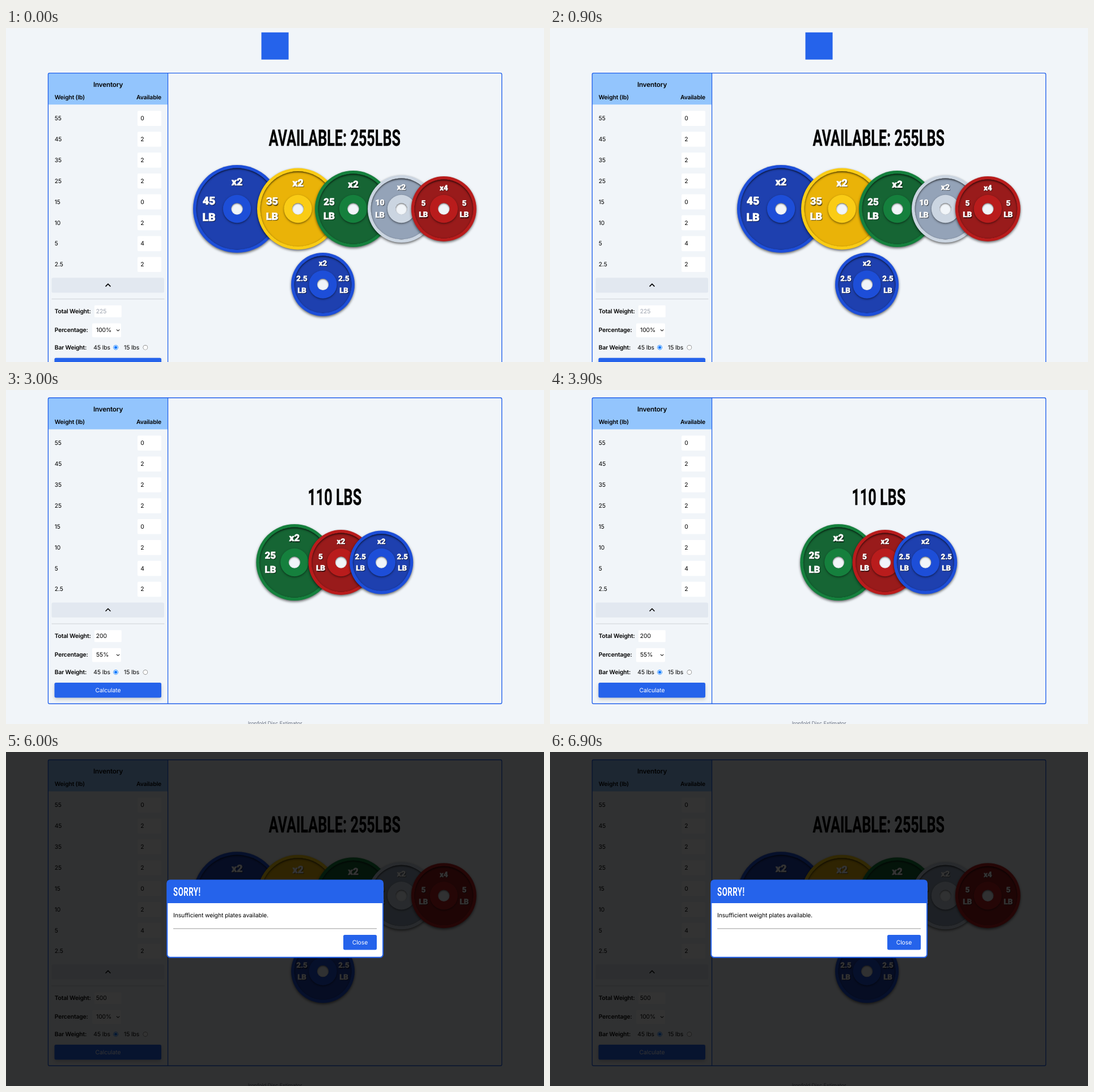
Recreate the animation shown at these times as an HTML page with a canvas. Size 949 px wide and 590 px high, loop 7.5 s.

```html
<!DOCTYPE html>
<html lang="en">
<head>
<meta charset="utf-8">
<title>Plate calculator</title>
<style>
html, body { margin: 0; width: 100%; height: 100%; overflow: hidden; background: #f1f5f9; }
canvas { display: block; width: 949px; height: 590px; }
</style>
</head>
<body>
<canvas id="stage"></canvas>
<script>
const W = 949, H = 590, STEP = 1500;
const canvas = document.getElementById('stage');
const ctx = canvas.getContext('2d');
const dpr = window.devicePixelRatio || 1;
canvas.width = W * dpr;
canvas.height = H * dpr;

const BLUE = '#2563eb', PAGE = '#f1f5f9';
const UI = 'Inter, "Noto Sans", sans-serif';
const CHUNKY = 'Roboto, Lato, sans-serif';
const TITLE = 'Roboto, "Liberation Sans", sans-serif';
const CONDENSED = 0.63;

// r: radius, size: label size, dx: label offset, top: count offset, a/b: label lines
const PLATES = {
  45:  { r: 77.5, size: 19.5, dx: 49.5, top: -48,   a: -14.7, b: 14, rim: '#1d4ed8', face: '#1e40af' },
  35:  { r: 72,   size: 18,   dx: 45.5, top: -46,   a: -13.5, b: 12.7, rim: '#facc15', face: '#eab308' },
  25:  { r: 67.5, size: 17,   dx: 42.5, top: -43.3, a: -13,   b: 12, rim: '#15803d', face: '#166534' },
  10:  { r: 59.5, size: 14,   dx: 38,   top: -39,   a: -11.5, b: 10.5, rim: '#cbd5e1', face: '#94a3b8' },
  5:   { r: 57.5, size: 13.5, dx: 36,   top: -37.8, a: -10.7, b: 10, rim: '#b91c1c', face: '#991b1b' },
  2.5: { r: 56,   size: 13.2, dx: 37,   top: -37.5, a: -10.5, b: 10, rim: '#1d4ed8', face: '#1e40af' }
};

// each plate: weight, count, x, y
const ALL = {
  title: 'AVAILABLE: 255LBS', titleY: 142.3,
  plates: [[45, 2, 407.5, 253.7], [35, 2, 515, 253.7], [25, 2, 612.5, 253.7],
           [10, 2, 697.5, 253.7], [5, 4, 772.3, 253.7], [2.5, 2, 559, 387.2]]
};
const LOAD_200 = {
  title: '200 LBS', titleY: 193,
  plates: [[45, 2, 462.7, 304.5], [25, 2, 565, 304.5], [5, 2, 647.5, 304.5], [2.5, 2, 718.7, 304.5]]
};
const LOAD_110 = {
  title: '110 LBS', titleY: 203,
  plates: [[25, 2, 508.8, 304.5], [5, 2, 591, 304.5], [2.5, 2, 662.2, 304.5]]
};

const SCENES = [
  { load: ALL, total: '', percent: '100%', offset: 65.8 },
  { load: LOAD_200, total: '200', percent: '100%' },
  { load: LOAD_110, total: '200', percent: '55%' },
  { load: LOAD_110, total: '200', percent: '10%', overlay: drawToast },
  { load: ALL, total: '500', percent: '100%', overlay: drawModal }
];
const INVENTORY = [[55, 0], [45, 2], [35, 2], [25, 2], [15, 0], [10, 2], [5, 4], [2.5, 2]];

function box(x, y, w, h, fill, radius = 0) {
  ctx.beginPath();
  ctx.roundRect(x, y, w, h, radius);
  ctx.fillStyle = fill;
  ctx.fill();
}

function disc(x, y, r, fill) {
  ctx.beginPath();
  ctx.arc(x, y, r, 0, Math.PI * 2);
  ctx.fillStyle = fill;
  ctx.fill();
}

function line(points, color, width) {
  ctx.beginPath();
  points.forEach(([x, y]) => ctx.lineTo(x, y));
  ctx.strokeStyle = color;
  ctx.lineWidth = width;
  ctx.stroke();
}

function shadow(dx, dy, blur, alpha) {
  ctx.shadowColor = `rgba(0,0,0,${alpha})`;
  ctx.shadowOffsetX = dx * dpr;
  ctx.shadowOffsetY = dy * dpr;
  ctx.shadowBlur = blur * dpr;
}

function noShadow() {
  ctx.shadowColor = 'transparent';
}

function text(str, x, y, { size = 10.4, weight = 400, color = '#000', align = 'left', spacing = -0.1, family = UI } = {}) {
  ctx.font = `${weight} ${size}px ${family}`;
  ctx.letterSpacing = spacing + 'px';
  ctx.textAlign = align;
  ctx.fillStyle = color;
  ctx.fillText(str, x, y);
}

function bold(str, x, y, opts) {
  text(str, x, y, { weight: 600, spacing: -0.17, ...opts });
}

function condensed(str, x, y, size, color, align, heft, spacing) {
  ctx.save();
  ctx.translate(x, y);
  ctx.scale(CONDENSED, 1);
  text(str, 0, 0, { size, weight: 700, color, align, spacing, family: TITLE });
  if (heft) {
    ctx.strokeStyle = color;
    ctx.lineWidth = heft;
    ctx.strokeText(str, 0, 0);
  }
  ctx.restore();
}

// dark inner edge of a round recess
function recess(x, y, r, dy, blur, alpha) {
  ctx.save();
  ctx.beginPath();
  ctx.arc(x, y, r, 0, Math.PI * 2);
  ctx.clip();
  shadow(0, dy, blur, alpha);
  ctx.beginPath();
  ctx.arc(x, y, r + 12, 0, Math.PI * 2);
  ctx.arc(x, y, r + 0.4, 0, Math.PI * 2, true);
  ctx.fillStyle = '#000';
  ctx.fill();
  ctx.restore();
}

// heavy white lettering with a hard shadow
function stamp(str, x, y, size) {
  const style = { size, weight: 900, color: '#fff', align: 'center', spacing: 0, family: CHUNKY };
  const base = y + size * 0.36;
  shadow(1, 1.2, 1.2, 0.75);
  text(str, x, base, style);
  noShadow();
  ctx.strokeStyle = '#fff';
  ctx.lineWidth = size * 0.035;
  ctx.strokeText(str, x, base);
}

function drawPlate([weight, count, x, y]) {
  const p = PLATES[weight];
  shadow(0, 2, 4, 0.6);
  disc(x, y, p.r, p.rim);
  noShadow();
  disc(x, y, p.r - 5.6, p.face);
  recess(x, y, p.r - 5.6, 1.5, 3.5, 0.85);
  shadow(0, 1.5, 3.5, 0.5);
  disc(x, y, 24.7, p.rim);
  noShadow();
  disc(x, y, 10.2, PAGE);
  recess(x, y, 10.2, 1.2, 2.8, 0.75);

  stamp('x' + count, x, y + p.top, Math.min(p.size, 18));
  for (const side of [-1, 1]) {
    stamp(String(weight), x + side * p.dx, y + p.a, p.size);
    stamp('LB', x + side * p.dx, y + p.b, p.size);
  }
}

function drawSidebar(scene) {
  box(74.5, 14, 211, 55.5, '#93c5fd');
  bold('Inventory', 180, 38, { size: 11.7, align: 'center' });
  bold('Weight (lb)', 85.7, 60.2);
  bold('Available', 274, 60.2, { align: 'right' });

  INVENTORY.forEach(([weight, count], i) => {
    const y = 94 + i * 36.88;
    text(String(weight), 85.7, y + 3.3);
    box(232, y - 13.5, 42, 26.6, '#fff', 2);
    text(String(count), 237.2, y + 3.3);
  });

  box(80.5, 375.5, 198.5, 26.3, '#e2e8f0', 2.6);
  line([[175.6, 390.8], [180, 386.3], [184.4, 390.8]], '#000', 1.6);
  box(80.5, 412.5, 199, 1, '#cdd1d6');

  bold('Total Weight:', 85.7, 438.2);
  box(156, 424.3, 47.8, 21, '#fff', 1.5);
  text(scene.total || '225', 158.8, 438.2, { color: scene.total ? '#000' : '#9ca3af' });

  bold('Percentage:', 85.7, 471.4);
  box(152, 456, 51, 24.5, '#fff', 2);
  text(scene.percent, 159, 471.4);
  line([[194.9, 466.9], [197.6, 469.4], [200.3, 466.9]], '#222', 1.1);

  bold('Bar Weight:', 85.7, 502);
  text('45 lbs', 154.3, 502);
  disc(193.6, 498.5, 4.3, '#0075ff');
  disc(193.6, 498.5, 3.5, '#fff');
  disc(193.6, 498.5, 2.5, '#0075ff');
  text('15 lbs', 208, 502);
  disc(245.8, 498.5, 4.3, '#767676');
  disc(245.8, 498.5, 3.6, '#fff');

  shadow(0, 3, 6, 0.18);
  box(85.5, 516.9, 188.5, 26.5, BLUE, 2.6);
  noShadow();
  text('Calculate', 180, 534, { color: '#fff', align: 'center' });
}

function drawPage(scene) {
  const { load } = scene;
  box(450.5, -58, 48, 48, BLUE);
  drawSidebar(scene);
  box(284.9, 14, 1.3, 540, BLUE);
  ctx.beginPath();
  ctx.roundRect(74.4, 13.8, 800.2, 540.5, 2.6);
  ctx.strokeStyle = BLUE;
  ctx.lineWidth = 1.4;
  ctx.stroke();
  condensed(load.title, 579.7, load.titleY, 40, '#000', 'center', 0.3, 0);
  load.plates.forEach(drawPlate);
  text('Ironfold Disc Estimator', 474.5, 591.5, { size: 9.2, color: '#6b7280', align: 'center' });
}

function drawToast() {
  box(358.3, 10.6, 232.5, 52.6, '#ef4444', 4);
  text('The target weight must exceed the bar', 368.8, 33, { color: '#fff' });
  text('weight. Please adjust your inputs.', 368.8, 48.8, { color: '#fff' });
}

function drawModal() {
  box(0, 0, W, H, 'rgba(0,0,0,0.8)');
  box(283.2, 225.4, 382.8, 138.4, BLUE, 6.5);
  box(285.2, 267, 378.8, 94.8, '#fff', [0, 0, 4.5, 4.5]);
  condensed('SORRY!', 295, 254, 21, '#fff', 'left', 0, 0.8);
  text('Insufficient weight plates available.', 295, 292);
  box(295, 311.6, 359, 1, '#9a9a9a');
  box(595, 323, 59, 26.4, BLUE, 2.6);
  text('Close', 624.4, 340, { color: '#fff', align: 'center' });
}

function draw(time) {
  const scene = SCENES[Math.floor(time / STEP) % SCENES.length];
  ctx.setTransform(dpr, 0, 0, dpr, 0, 0);
  ctx.textRendering = 'geometricPrecision';
  ctx.lineJoin = 'round';
  box(0, 0, W, H, PAGE);
  ctx.save();
  ctx.translate(0, scene.offset || 0);
  drawPage(scene);
  ctx.restore();
  if (scene.overlay) scene.overlay();
}

const start = performance.now();
function tick() {
  draw(performance.now() - start);
  requestAnimationFrame(tick);
}
tick();
</script>
</body>
</html>
```
